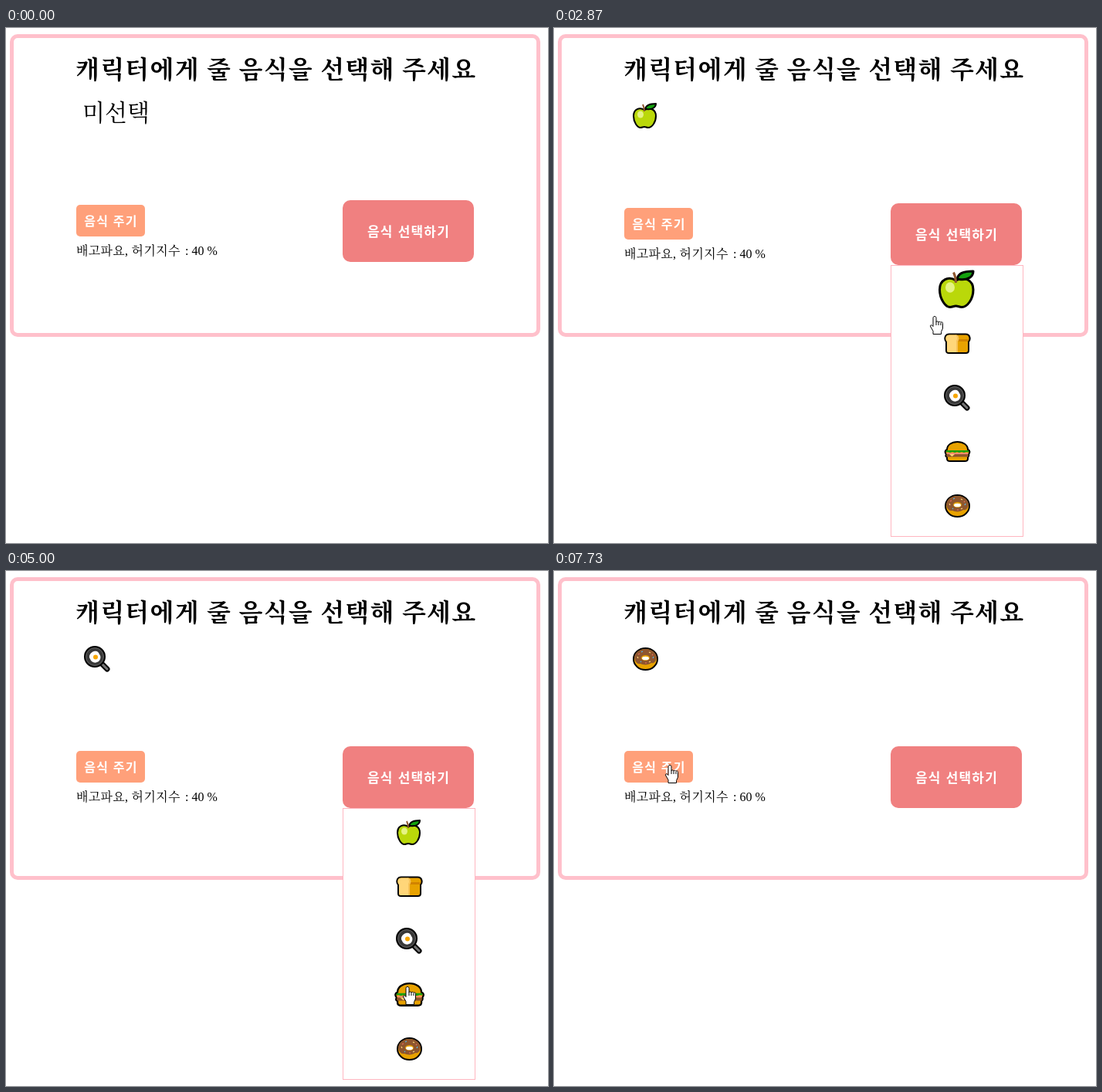
An HTML page that plays this animation: 702 px wide and 667 px high, repeating every 8000 ms.

```html
<!DOCTYPE html>
<html lang="ko">
<head>
<meta charset="utf-8">
<style>
  html, body { margin: 0; height: 100%; overflow: hidden; background: #fff; }
  svg { display: block; width: 702px; height: 667px; }
  text { font-family: "Liberation Serif", "Noto Serif CJK KR", "Noto Sans CJK KR", "Noto Sans CJK", serif; }
  .button { font-family: "Noto Sans CJK KR", "Noto Sans CJK", sans-serif; font-weight: bold; fill: #fff; letter-spacing: 1.2px; }
</style>
</head>
<body>
<svg viewBox="0 0 702 667">
  <defs>
    <g id="apple" stroke="#000" stroke-width="2" stroke-linejoin="round">
      <path fill="#bad80a" d="M-1-8C-7-12-15-9-15 0C-15 8-10 15-6 15C-4 15-3 14-1 14C1 14 2 15 4 15C9 15 14 8 14 0C14-8 7-12-1-8Z"/>
      <ellipse cx="-6" cy="-2" rx="4" ry="4.5" fill="#e5f384" stroke="none"/>
      <path fill="#13a10e" d="M0-9C1-14 5-16 14-16C14-11 9-8 2-9Z"/>
      <path fill="none" stroke="#8e562e" d="M-1-6C-1-11-2-13-3-15"/>
    </g>
    <g id="bread">
      <path fill="#e8a200" stroke="#000" stroke-width="4" d="M-10-11.500H11C16.500-11.500 16.500-5 14-3V8.500Q14 11 11.500 11H-10.500Q-13 11-13 8.500V-3C-15.500-5-15.500-11.500-10-11.500Z"/>
      <path fill="#e8a200" d="M-10-11.500H11C16.500-11.500 16.500-5 14-3V8.500Q14 11 11.500 11H-10.500Q-13 11-13 8.500V-3C-15.500-5-15.500-11.500-10-11.500Z"/>
      <path fill="#ffd679" d="M-10-11.500H-2C3-11.500 3-5 1-3V11H-10.500Q-13 11-13 8.500V-3C-15.500-5-15.500-11.500-10-11.500Z"/>
      <path fill="#f7c35a" d="M-2-11.500C3-11.500 3-5 1-3V11H-1V-4C1-6 0-10-2-11.500Z"/>
      <path fill="#d18300" d="M2.500-6H14.500L14-3H1.500Z"/>
    </g>
    <g id="pan" stroke-linecap="round">
      <path d="M5 5L13 13" stroke="#000" stroke-width="7"/>
      <path d="M6 6L13 13" stroke="#767676" stroke-width="3"/>
      <circle cx="-3" cy="-3" r="13" fill="#383838" stroke="#000" stroke-width="2"/>
      <circle cx="-3" cy="-3" r="11.300" fill="none" stroke="#606060"/>
      <path fill="#fff" d="M-4-10C0-11 2-9 3-6C6-3 4 3 0 4C-4 6-8 3-9 0C-12-4-8-9-4-10Z"/>
      <circle cx="-2" cy="-2.500" r="3" fill="#f7a600"/>
    </g>
    <g id="burger">
      <path fill="#e8a200" stroke="#000" stroke-width="2" stroke-linejoin="round" d="M-13-3C-13-9-7-13 .500-13S14-9 14-3C17-2 17 1 15 3C16 5 15 6 14 7V9Q14 12 10 12H-9Q-13 12-13 9V7C-15 6-15 5-14 3C-16 1-16-2-13-3Z"/>
      <path fill="#16a010" d="M-14-2H15V.500L12 0L9 1L6 0L3 1L0 0L-3 1L-6 0L-9 1L-12 0L-14 .500Z"/>
      <path fill="#ff8b70" d="M-13.500 1H14.500V3H-13.500Z"/>
      <path fill="#8e562e" d="M-13.500 3H14.500V6.500H-13.500Z"/>
      <path fill="#ffd679" d="M-10 3H-3L-6.500 6Z"/>
    </g>
    <g id="donut">
      <ellipse cx=".500" rx="15.500" ry="14" fill="#e8a200" stroke="#000" stroke-width="2"/>
      <path fill="#8e562e" d="M-14-2C-13-9-7-13 .500-13S14-9 15-2C14 4 11 6 8 5C5 8-3 8-6 6C-10 7-13 4-14-2Z"/>
      <ellipse cx=".500" cy="-1.500" rx="5.500" ry="3.500" fill="#e8a200"/>
      <ellipse cx=".500" cy="-1" rx="4.500" ry="2.300" fill="#fff"/>
      <path stroke="#ffd679" stroke-width="1.200" d="M-10-3l1 2M5-9l2 1M5 4l2-1"/>
      <path stroke="#55b9e8" stroke-width="1.200" d="M-5-9l2-1M11-3l-1 2M-6 3l1 1"/>
      <path stroke="#ef6b63" stroke-width="1.200" d="M-9-6l2-1M9-6l1 1M0 5l2 0"/>
    </g>
  </defs>

  <rect x="7.500" y="10.500" width="682" height="387" rx="7.500" fill="#fff" stroke="#ffc0cb" stroke-width="5"/>
  <text x="90" y="65" font-size="32" font-weight="600" letter-spacing="1.250">캐릭터에게 줄 음식을 선택해 주세요</text>
  <text id="none" x="99" y="120" font-size="30" font-weight="300">미선택</text>
  <use id="chosen" transform="translate(118 114)"/>
  <g id="lower">
    <rect x="91" y="229" width="89" height="41" rx="5" fill="#ffa07a"/>
    <text class="button" x="136" y="256" font-size="16" text-anchor="middle">음식 주기</text>
    <text x="91" y="294" font-size="16"><tspan letter-spacing=".3">배고파요, 허기지수</tspan><tspan id="hunger" x="232"></tspan></text>
    <rect x="436" y="223" width="170" height="80" rx="10" fill="#f08080"/>
    <text class="button" x="521.500" y="270" font-size="17" text-anchor="middle">음식 선택하기</text>
    <g id="menu">
      <rect x="436.500" y="303.500" width="171" height="351" fill="#fff" stroke="#ffb6c1"/>
    </g>
  </g>
  <g id="hand" fill="#fff" stroke="#000" stroke-linejoin="round">
    <path d="M6 .500C4.500 .500 4 1.500 4 2.500V13.500L2.500 12C1 11 0 12.500 .800 14L4 19.500V23.500H14.500V20.500L16.500 16V9.500C16.500 7.500 14.500 7.500 14 8.500C13.500 7 11.500 7 11 8C10.500 6.500 8.500 6.800 8 7.500V2.500C8 1.500 7.500 .500 6 .500Z"/>
    <path d="M8 7V12M11 8V12M14 9V12"/>
  </g>
</svg>
<script>
const $ = id => document.getElementById(id);
const FPS = 15, TICKS = 120, GROW = 7.5;
const foods = ['apple', 'bread', 'pan', 'burger', 'donut'];

// All times are in ticks of 1/15 s.
const hoverAt = [23.7, 43.5, 59, 73.5, 84.2, 94];
const clickAt = [30, 48, 68, 79, 90];
const menuOpen = 16, menuClose = 94, fedAt = 116;
const handPath = [
  [16, 595, 281], [17, 540, 291], [21, 540, 291], [25, 522, 329], [26, 526, 329], [33, 526, 329],
  [34, 504, 335], [35, 476, 337], [36, 476, 337], [43.5, 488, 376], [46, 497, 411], [56, 497, 411],
  [59, 503, 446], [63, 507, 478], [71, 507, 478], [73.5, 512, 517], [76, 515, 552], [81, 515, 552],
  [84, 522, 601], [85, 523, 613], [91, 523, 613], [97, 311, 362], [101, 200, 285], [105, 144, 251],
  [120, 144, 251]
];

const items = foods.map(name => {
  const item = document.createElementNS('http://www.w3.org/2000/svg', 'use');
  item.setAttribute('href', '#' + name);
  return $('menu').appendChild(item);
});

const show = (el, on) => el.setAttribute('visibility', on ? 'visible' : 'hidden');

// CSS "ease": cubic-bezier(.25, .1, .25, 1)
function ease(x) {
  if (x >= 1) return 1;
  const bezier = (a, b, s) => 3 * a * s * (1 - s) ** 2 + 3 * b * s * s * (1 - s) + s ** 3;
  let low = 0, high = 1;
  for (let i = 0; i < 20; i++) {
    const mid = (low + high) / 2;
    if (bezier(.25, .25, mid) < x) low = mid; else high = mid;
  }
  return bezier(.1, 1, low);
}

function handPosition(tick) {
  const next = handPath.findIndex(key => key[0] > tick);
  const [t0, x0, y0] = handPath[next - 1], [t1, x1, y1] = handPath[next];
  const p = (tick - t0) / (t1 - t0);
  return [x0 + (x1 - x0) * p, y0 + (y1 - y0) * p].map(Math.round);
}

function draw(tick) {
  const picked = clickAt.filter(t => t <= tick).length - 1;
  show($('none'), picked < 0);
  show($('chosen'), picked >= 0);
  if (picked >= 0) $('chosen').setAttribute('href', '#' + foods[picked]);
  $('lower').setAttribute('transform', `translate(0 ${picked < 0 ? 0 : 4})`);
  $('hunger').textContent = `: ${tick < fedAt ? 40 : 60} %`;

  show($('menu'), tick >= menuOpen && tick < menuClose);
  items.forEach((item, i) => {
    const hovered = tick >= hoverAt[i] && tick < hoverAt[i + 1];
    const scale = hovered ? 1 + ease((tick - hoverAt[i]) / GROW) / 2 : 1;
    item.setAttribute('transform', `translate(522 ${335 + 70 * i}) scale(${scale})`);
  });

  const handVisible = tick >= menuOpen;
  show($('hand'), handVisible);
  if (handVisible) $('hand').setAttribute('transform', `translate(${handPosition(tick)})`);
}

function frame() {
  draw(Math.floor((performance.now() + 4) * FPS / 1000) % TICKS);
  requestAnimationFrame(frame);
}
frame();
</script>
</body>
</html>
```
